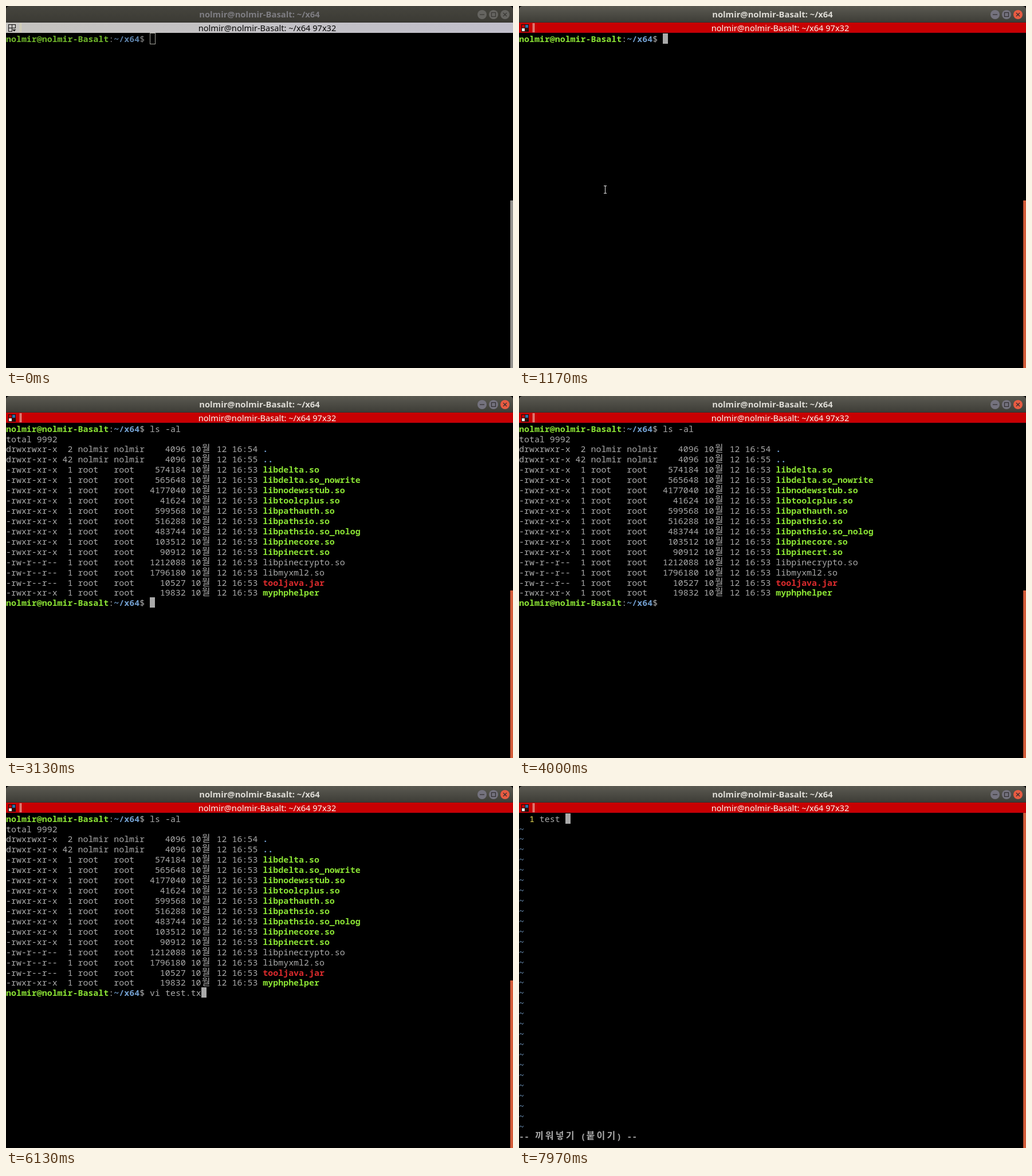
An HTML page with a canvas that plays this animation: 885x633 px, repeating every 8 s.

```html
<!DOCTYPE html>
<html lang="ko">
<head>
<meta charset="utf-8">
<title>Terminal</title>
<style>
html, body { margin: 0; width: 100%; height: 100%; overflow: hidden; background: #000; }
canvas { display: block; width: 885px; height: 633px; }
</style>
</head>
<body>
<canvas id="stage" width="885" height="633"></canvas>
<script>
const ctx = document.getElementById('stage').getContext('2d');
const W = 885, H = 633, LOOP = 8000;
const CELL = 8.967, LINE = 17.93, TOP = 47.6;
const MONO = '14.945px "Noto Sans Mono", monospace';
const HANGUL = '16px "Noto Sans CJK KR", "Noto Sans CJK", sans-serif';
const SANS = '"Noto Sans", sans-serif';

const GREY = '#aaaaaa', GREEN = '#8ae234', BLUE = '#729fcf', RED = '#dc2b2d';
const USER = 'nolmir', HOST = USER + '@' + USER + '-Basalt', DIR = '~/x64';
const TITLE = `${HOST}: ${DIR}`;

const FOCUS = 665, FADE = 700, LIST = 3125, EDITOR = 6465, INSERT = 7065;
const keys = (text, times) => times.map((time, i) => ({ time, char: text[i] }));
const LS = keys('ls -al', [1765, 2095, 2495, 2605, 2725, 2865]);
const VI = keys('vi test.txt', [5065, 5165, 5235, 5325, 5435, 5535, 5645, 5765, 5865, 6125, 6265]);
const WORD = keys('test ', [7345, 7485, 7605, 7745, 7925]);
const EVENTS = [FOCUS, LIST, EDITOR, INSERT, ...[LS, VI, WORD].flat().map(k => k.time)].sort((a, b) => a - b);

const ROOT_FILES = [
  ['574184', 'libdelta.so'], ['565648', 'libdelta.so_nowrite'],
  ['4177040', 'libnodewsstub.so'], ['41624', 'libtoolcplus.so'],
  ['599568', 'libpathauth.so'], ['516288', 'libpathsio.so'],
  ['483744', 'libpathsio.so_nolog'], ['103512', 'libpinecore.so'],
  ['90912', 'libpinecrt.so'], ['1212088', 'libpinecrypto.so', GREY],
  ['1796180', 'libmyxml2.so', GREY], ['10527', 'tooljava.jar', RED],
  ['19832', 'myphphelper']
];

const clamp = v => Math.max(0, Math.min(1, v));
const typed = (list, t) => list.filter(k => k.time <= t).map(k => k.char).join('');
const mix = (a, b, p) => `rgb(${a.map((v, i) => Math.round(v + (b[i] - v) * p))})`;

function box(x, y, w, h, color) {
  ctx.fillStyle = color;
  ctx.fillRect(x, y, w, h);
}

function stroke(color, width, ...lines) {
  ctx.strokeStyle = color;
  ctx.lineWidth = width;
  ctx.beginPath();
  for (const [x1, y1, x2, y2] of lines) {
    ctx.moveTo(x1, y1);
    ctx.lineTo(x2, y2);
  }
  ctx.stroke();
}

function label(text, x, y, font, color) {
  ctx.font = `${font} ${SANS}`;
  ctx.textAlign = 'center';
  ctx.fillStyle = color;
  ctx.fillText(text, x, y);
}

// Writes on the character grid; Hangul takes two cells. Returns the next column.
function put(text, col, row, color, bold) {
  const weight = bold ? 'bold ' : '';
  const y = Math.round(TOP + row * LINE + 15);
  ctx.fillStyle = color;
  ctx.textAlign = 'left';
  for (const run of text.match(/[\u1100-\uffff]|[^\u1100-\uffff]+/g) || []) {
    const wide = run.charCodeAt(0) >= 0x1100;
    ctx.font = weight + (wide ? HANGUL : MONO);
    ctx.fillText(run, col * CELL + (wide ? 1 : 0), wide ? y - 1 : y);
    col += wide ? 2 : run.length;
  }
  return col;
}

function prompt(row, command) {
  let col = put(HOST, 0, row, GREEN, true);
  col = put(':', col, row, GREY);
  col = put(DIR, col, row, BLUE, true);
  col = put('$ ', col, row, GREY);
  return put(command, col, row, GREY);
}

function cursor(col, row, t) {
  const x = Math.round(col * CELL), y = Math.round(TOP + row * LINE);
  if (t < FOCUS) {
    ctx.strokeStyle = '#a5a59c';
    ctx.lineWidth = 1;
    ctx.strokeRect(x + 0.5, y - 0.5, 9, 19);
    return;
  }
  const last = EVENTS.filter(e => e <= t).pop();
  if (Math.floor((t - last) / 600) % 2 === 0) box(x, y, 9, 18, GREY);
}

function listing() {
  put('total 9992', 0, 1, GREY);
  const entry = (row, mode, links, owner, size, time, name, color) => {
    const own = owner.padEnd(6);
    const head = `${mode} ${links.padStart(2)} ${own} ${own}${size.padStart(8)} 10월 12 ${time} `;
    put(name, put(head, 0, row, GREY), row, color, color !== GREY);
  };
  entry(2, 'drwxrwxr-x', '2', USER, '4096', '16:54', '.', BLUE);
  entry(3, 'drwxr-xr-x', '42', USER, '4096', '16:55', '..', BLUE);
  ROOT_FILES.forEach(([size, name, color = GREEN], i) => {
    const mode = i > 8 && i < 12 ? '-rw-r--r--' : '-rwxr-xr-x';
    entry(i + 4, mode, '1', 'root', size, '16:53', name, color);
  });
}

function shell(t) {
  let row = 0;
  let col;
  ctx.globalAlpha = t < FOCUS ? 0.8 : 1;
  col = prompt(0, typed(LS, t));
  ctx.globalAlpha = 1;
  if (t >= LIST) {
    listing();
    row = 17;
    col = prompt(row, typed(VI, t));
  }
  cursor(col, row, t);
}

function editor(t) {
  const inserting = t >= INSERT;
  put('1', 2, 0, inserting ? '#e9dc55' : '#966d16');
  for (let row = 1; row < 31; row++) put('~', 0, row, '#6d94bd');
  if (inserting) put('-- 끼워넣기 (붙이기) --', 0, 31, GREY, true);
  else put('"test.txt" [새 파일]', 0, 31, GREY);
  cursor(put(typed(WORD, t), 4, 0, GREY), 0, t);
}

function titleBar(p) {
  const shade = ctx.createLinearGradient(0, 0, 0, 29);
  shade.addColorStop(0, mix([70, 69, 62], [91, 90, 82], p));
  shade.addColorStop(1, mix([59, 58, 52], [61, 60, 54], p));
  ctx.fillStyle = shade;
  ctx.beginPath();
  ctx.roundRect(0, 0, W, 29, [6, 6, 0, 0]);
  ctx.fill();
  box(0, 28, W, 1, '#33312d');
  label(TITLE, 442.5, 20, 'bold 14.8px', mix([126, 125, 130], [222, 220, 214], p));

  [831, 851, 871].forEach((x, i) => {
    ctx.fillStyle = mix([101, 100, 96], i === 2 ? [231, 91, 66] : [116, 114, 126], p);
    ctx.beginPath();
    ctx.arc(x, 15, 8, 0, 7);
    ctx.fill();
    const ink = mix([57, 56, 52], [49, 46, 48], p);
    if (i === 0) stroke(ink, 1.2, [x - 4, 15, x + 4, 15]);
    if (i === 1) {
      ctx.strokeStyle = ink;
      ctx.lineWidth = 1.2;
      ctx.strokeRect(x - 3.5, 11.5, 7, 7);
    }
    if (i === 2) stroke(ink, 1.3, [x - 3, 12, x + 3, 18], [x + 3, 12, x - 3, 18]);
  });
}

function groupIcon(active) {
  const fills = active ? ['#c40000', '#2d6ea8', '#eeeeec', '#500000'] : Array(4).fill('#c4c2c0');
  fills.forEach((color, i) => {
    const x = 4 + (i % 2) * 6, y = 32 + (i >> 1) * 6;
    if (i === 3 && !active) return;
    box(x, y, 7, 7, '#111');
    box(x + 1, y + 1, 5, 5, color);
  });
  ctx.fillStyle = '#111';
  ctx.beginPath();
  ctx.moveTo(11, 41);
  ctx.lineTo(17.5, 41);
  ctx.lineTo(14.2, 44.5);
  ctx.fill();
}

function paneBar(active) {
  if (active) {
    box(0, 29, W, 18, '#c80002');
    box(0, 46, W, 1, '#a80012');
  } else {
    const shade = ctx.createLinearGradient(0, 0, W, 0);
    shade.addColorStop(0, '#c5c3bf');
    shade.addColorStop(1, '#c1bfcb');
    box(0, 29, W, 18, shade);
  }
  groupIcon(active);
  const divider = active ? '#efe0d0' : '#d9d4b0';
  box(24, 30, 1, 16, divider);
  box(26, 30, 1, 16, divider);
  label(TITLE + ' 97x32', 456, 44, '14.6px', active ? '#fff6ee' : '#080808');
}

function scrollBar(top, p) {
  box(880, top, 5, H - top, mix([148, 146, 142], [211, 92, 58], p));
  box(880, top, 1, H - top, mix([122, 120, 116], [176, 78, 50], p));
}

function pointer(t) {
  if (t < 30 || t >= LS[0].time) return;
  const p = clamp((t - 30) / 570);
  const x = Math.round(-6 + 156 * (1 - (1 - p) ** 3)) + 0.5;
  stroke('#e4e4e4', 1, [x, 314, x, 327], [x - 2.5, 314.5, x + 2.5, 314.5], [x - 2.5, 327.5, x + 2.5, 327.5]);
}

function draw(t) {
  const focus = clamp((t - FADE) / 200);
  const editing = t >= EDITOR;
  box(0, 0, W, H, '#000');
  titleBar(focus);
  paneBar(t >= FOCUS);
  if (editing) editor(t);
  else shell(t);
  scrollBar(editing ? 47 : 340, focus);
  pointer(t);
}

let start;
function tick(now) {
  start ??= now;
  draw((now - start) % LOOP);
  requestAnimationFrame(tick);
}
requestAnimationFrame(tick);
</script>
</body>
</html>
```
